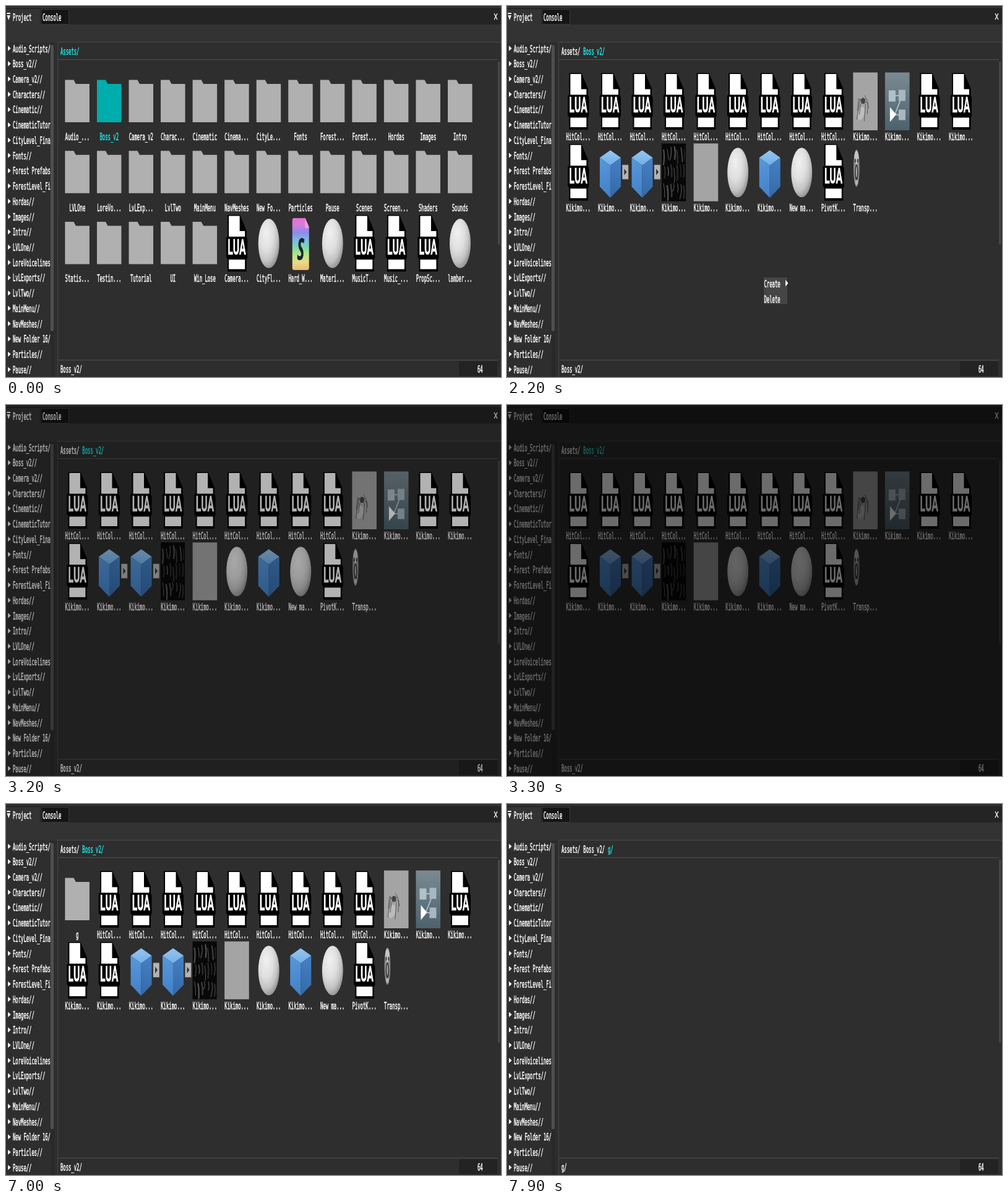
Write an HTML page with a canvas that moves like this. It is 800 by 600 pixels and loops after 8 s.

```html
<!DOCTYPE html>
<html lang="en">
<head>
<meta charset="utf-8">
<title>Asset browser</title>
<style>
html, body { margin: 0; width: 100%; height: 100%; overflow: hidden; background: #2e2e2e; }
canvas { display: block; }
</style>
</head>
<body>
<canvas id="stage" width="800" height="600"></canvas>
<script>
const ctx = document.getElementById('stage').getContext('2d');
const LOOP = 8000;
const SQUEEZE = 0.452;            // the whole interface is narrowed sideways
const UI_FONT = '16px "DejaVu Sans Mono", monospace';
const LOGO_FONT = 'bold 35px Roboto, sans-serif';
const CYAN = '#1fe6e6', WHITE = '#fff';
const COLUMNS = 13, LEFT = 95.4, TOP = 107.5, STEP_X = 51.55, STEP_Y = 114.8;

const tree = ('Audio_Scripts,Boss_v2,Camera_v2,Characters,Cinematic,CinematicTutorial,' +
  'CityLevel_Final,Fonts,Forest Prefabs,ForestLevel_Final,Hordas,Images,Intro,LVLOne,' +
  'LoreVoicelines,LvLExports,LvlTwo,MainMenu,NavMeshes,New Folder 16,Particles,Pause').split(',');

const item = (kind, label) => ({ kind, label });
const folders = ('Audio_...,Boss_v2,Camera_v2,Charac...,Cinematic,Cinema...,CityLe...,Fonts,' +
  'Forest...,Forest...,Hordas,Images,Intro,LVLOne,LoreVo...,LvLExp...,LvlTwo,MainMenu,' +
  'NavMeshes,New Fo...,Particles,Pause,Scenes,Screen...,Shaders,Sounds,Statis...,Testin...,' +
  'Tutorial,UI,Win_Lose').split(',').map(name => item('folder', name));
const parse = list => list.split(',').map(entry => item(...entry.split(':')));

const rootItems = [...folders, ...parse('lua:Camera...,sphere:CityFl...,shader:Hard_W...,' +
  'sphere:Materi...,lua:MusicT...,lua:Music_...,lua:PropSc...,sphere:lamber...')];
const bossItems = [...Array(9).fill(item('lua', 'HitCol...')), ...parse('spider:Kikimo...,' +
  'graph:Kikimo...,lua:Kikimo...,lua:Kikimo...,lua:Kikimo...,model:Kikimo...,model:Kikimo...,' +
  'bones:Kikimo...,plain:Kikimo...,sphere:Kikimo...,cube:Kikimo...,sphere:New ma...,' +
  'lua:PivotK...,mask:Transp...')];
const bossWithFolder = [item('folder', 'g'), ...bossItems];

function rect(x, y, w, h, color) {
  ctx.fillStyle = color;
  ctx.fillRect(x, y, w, h);
}

function poly(color, ...points) {
  ctx.fillStyle = color;
  ctx.beginPath();
  for (let i = 0; i < points.length; i += 2) ctx.lineTo(points[i], points[i + 1]);
  ctx.fill();
}

function line(color, width, ...points) {
  ctx.strokeStyle = color;
  ctx.lineWidth = width;
  ctx.beginPath();
  for (let i = 0; i < points.length; i += 2) ctx.lineTo(points[i], points[i + 1]);
  ctx.stroke();
}

function ellipse(x, y, rx, ry, color, angle = 0) {
  ctx.fillStyle = color;
  ctx.beginPath();
  ctx.ellipse(x, y, rx, ry, angle, 0, Math.PI * 2);
  ctx.fill();
}

function rounded(x, y, w, h, r, color) {
  ctx.fillStyle = color;
  ctx.beginPath();
  ctx.roundRect(x, y, w, h, r);
  ctx.fill();
}

function gradient(x0, y0, x1, y1, ...colors) {
  const g = ctx.createLinearGradient(x0, y0, x1, y1);
  colors.forEach((c, i) => g.addColorStop(i / (colors.length - 1), c));
  return g;
}

// y is the middle of the capitals; the thin stroke gives the font its pixel weight
function text(str, x, y, color = WHITE, align = 'left', font = UI_FONT, drop = 5.5) {
  ctx.save();
  ctx.translate(x, y + drop);
  ctx.scale(SQUEEZE, 1);
  ctx.font = font;
  ctx.textAlign = align;
  ctx.fillStyle = ctx.strokeStyle = color;
  ctx.lineWidth = 0.6;
  ctx.fillText(str, 0, 0);
  ctx.strokeText(str, 0, 0);
  ctx.restore();
}

function seeded(seed) {
  return () => (seed = seed * 16807 % 2147483647) / 2147483647;
}

// Icons are drawn in a cell of 40 by 93
const icons = {
  folder(selected) {
    poly(selected ? '#00adad' : '#b0b0b0', 0, 12, 14, 12, 17.5, 18.5, 39.5, 18.5, 39.5, 80.5, 0, 80.5);
  },
  lua() {
    poly('#000', 5, 1, 25, 1, 35.5, 26, 35.5, 92.5, 5, 92.5);
    poly('#fff', 7, 2.5, 24.5, 2.5, 24.5, 27, 33, 27, 33, 38, 7, 38);
    rect(7, 73, 26, 15.5, '#fff');
    rounded(2.7, 36, 34.3, 36.5, [3, 5], '#000');
    text('LUA', 19.8, 52, '#fff', 'center', LOGO_FONT, 12.4);
  },
  sphere() {
    const g = ctx.createRadialGradient(10, 30, 2, 10, 35, 56);
    g.addColorStop(0, '#efefef');
    g.addColorStop(0.45, '#dfdfdf');
    g.addColorStop(0.75, '#c2c2c2');
    g.addColorStop(1, '#8c8c8c');
    ctx.save();
    ctx.translate(20, 47);
    ctx.scale(0.43, 1);
    ctx.translate(-20, -47);
    ellipse(20, 47, 39.5, 40, g);
    ctx.restore();
  },
  shader() {
    const colors = gradient(0, 6, 4, 90, '#e66fd0', '#d77bdc', '#8b8bea', '#80b6e8', '#7ed9a8',
      '#b7e58a', '#e8dc86', '#eeb878');
    rounded(6.5, 6, 27, 84, 3, colors);
    poly('#2e2e2e', 27, 5, 35, 5, 35, 23);
    poly('#f0a0dc', 27, 6, 33.5, 22, 27, 22);
    text('S', 20, 57, '#17242a', 'center', 'bold italic 48px "Open Sans", sans-serif', 17);
  },
  cube() {
    poly(gradient(0, 11, 0, 36, '#95c5f0', '#72aee8'), 20, 11, 37, 23, 20, 35.5, 3, 23);
    poly(gradient(3, 23, 20, 88, '#5898dc', '#4280c6'), 3, 23, 20, 35.5, 20, 88, 3, 70);
    poly(gradient(37, 23, 20, 88, '#4681c5', '#3568a6'), 37, 23, 20, 35.5, 20, 88, 37, 70);
  },
  model() {
    icons.cube();
    rect(39.3, 34.5, 10, 23.5, '#a4a4a4');
    rect(40, 35.5, 8.6, 21.5, '#b4b4b4');
    poly('#333', 42.5, 41, 46.5, 46.3, 42.5, 51.5);
  },
  plain() {
    rect(0, 0, 39.6, 93.5, '#a4a4a4');
  },
  spider() {
    icons.plain();
    ellipse(13, 66, 5.5, 11, '#bcbcbc', 0.25);
    ellipse(16, 46, 3.5, 5, '#444');
    const legs = [[9, 42, 7, 62], [11, 44, 6, 76], [12, 52, 10, 68], [22, 43, 25, 58],
      [24, 49, 23, 67], [20, 52, 18, 79], [21, 41, 18, 37]];
    for (const leg of legs) line('#444', 0.8, 16, 47, ...leg);
  },
  graph() {
    rect(0, 0, 39.6, 93.5, gradient(0, 0, 0, 93, '#7b8a92', '#637681', '#4d626d'));
    line('#b2c0c8', 1.8, 12, 38, 28, 37, 16, 68, 28, 69);
    rect(6, 29, 11, 18, '#b2c0c8');
    rect(22, 28, 11, 18, '#a8b7c0');
    rect(22, 60, 11, 17, '#a8b7c0');
    poly('#fff', 8, 56, 18, 68, 8, 80);
  },
  bones() {
    rect(0, 0, 39, 93.5, '#080808');
    const random = seeded(91);
    ctx.lineCap = 'round';
    for (let i = 0; i < 21; i++) {
      const x = 3 + i % 7 * 5.3 + random() * 2, y = 5 + Math.floor(i / 7) * 29 + random() * 6;
      const shade = 28 + random() * 60;
      ctx.strokeStyle = `rgb(${shade},${shade},${shade})`;
      ctx.lineWidth = 1 + random() * 1.8;
      ctx.beginPath();
      ctx.moveTo(x, y);
      ctx.quadraticCurveTo(x + 2, y + 10, x + random() * 4 - 2, y + 13 + random() * 11);
      ctx.stroke();
    }
    ctx.lineCap = 'butt';
  },
  mask() {
    ellipse(5.5, 40, 4.8, 30, '#8c8c8c');
    ellipse(5.5, 23, 3.6, 11, '#c4c4c4');
    ellipse(3.5, 28, 1.1, 3.5, '#444');
    ellipse(7.5, 28, 1.1, 3.5, '#444');
    ellipse(5.5, 47, 2.8, 13, '#3a3a3a');
    ellipse(5.5, 46, 1.2, 9, '#a5a5a5');
    ellipse(5.5, 63, 2, 4, '#b5b5b5');
  }
};

function drawChrome() {
  rect(0, 0, 800, 600, '#2e2e2e');
  rect(0, 0, 800, 30, '#242424');
  rect(0, 1.5, 800, 1.5, '#3a3a3a');
  rect(0, 5, 55, 25, '#333');
  rect(56.5, 5, 45.5, 25, '#383838');
  rect(57.5, 6, 43.5, 23, '#151515');
  rect(0, 30, 800, 29, '#333');
  rect(1.5, 11, 5.5, 2, WHITE);
  poly(WHITE, 1.5, 15, 7, 15, 4.2, 23);
  text('Project', 11, 18);
  text('Console', 59, 18);
  line(WHITE, 1.2, 789, 12, 794, 22);
  line(WHITE, 1.2, 794, 12, 789, 22);

  rect(72, 60, 5.5, 540, '#292929');
  rounded(72, 63, 5, 463, 2.5, '#4f4f4f');
  rect(83, 58, 717, 1.2, '#454545');
  rect(83, 58, 1.2, 542, '#434343');
  rect(84, 86, 711, 1.3, '#4a4a4a');
  rect(84, 572, 711, 1.3, '#4a4a4a');
  rounded(795.3, 90, 2.7, 296, 1.3, '#4b4b4b');
  rect(732, 574.5, 62, 24, '#232323');
  text('64', 762, 587);

  ctx.save();
  ctx.beginPath();
  ctx.rect(0, 59, 71.7, 541);
  ctx.clip();
  tree.forEach((name, i) => {
    const y = 69 + i * 24.73;
    poly(WHITE, 3.2, y - 4.7, 7.7, y - 0.5, 3.2, y + 3.7);
    text(name + '//', 11, y);
  });
  ctx.restore();
}

function drawPath(parts, status) {
  let x = 88;
  parts.forEach((part, i) => {
    text(part + '/', x, 73, i === parts.length - 1 ? CYAN : WHITE);
    x += (part.length + 1) * 4.36 + 4.8;
  });
  text(status + '/', 88, 587);
}

function drawItems(items, selected) {
  items.forEach(({ kind, label }, i) => {
    const x = LEFT + i % COLUMNS * STEP_X, y = TOP + Math.floor(i / COLUMNS) * STEP_Y;
    ctx.save();
    ctx.translate(x, y);
    icons[kind](i === selected);
    ctx.restore();
    text(label, x + 19.8, y + 103.8, i === selected ? CYAN : WHITE, 'center');
  });
}

function drawMenu(time) {
  const submenu = time >= 2500, onFolder = time >= 2800;
  rect(415, 439, 38, 43, '#454545');
  if (submenu && !onFolder) rect(415, 440, 38, 20, '#747474');
  text('Create', 415.5, 449);
  text('Delete', 415.5, 474);
  if (submenu) {
    rect(452, 438.5, 49, 117.5, '#4b4b4b');
    if (onFolder) rect(452.5, 440, 48, 20, '#767676');
    ['Folder', 'Material', 'Shader', 'Script', 'Scene'].forEach((name, i) =>
      text(name, 452.5, 449 + i * 24.73));
  }
  poly(WHITE, 450, 443, 454.5, 448.3, 450, 453.5);
}

function draw(time) {
  drawChrome();
  if (time < 1300) {
    drawPath(['Assets'], 'Boss_v2');
    drawItems(rootItems, 1);
  } else if (time < 7000) {
    drawPath(['Assets', 'Boss_v2'], 'Boss_v2');
    drawItems(bossItems);
  } else if (time < 7900) {
    const clicked = time >= 7800;
    drawPath(['Assets', 'Boss_v2'], clicked ? 'g' : 'Boss_v2');
    drawItems(bossWithFolder, clicked ? 0 : -1);
  } else {
    drawPath(['Assets', 'Boss_v2', 'g'], 'g');
  }
  if (time >= 2200 && time < 3200) drawMenu(time);
  if (time >= 3200 && time < 5300) {
    rect(0, 0, 800, 600, `rgba(0,0,0,${time < 3300 ? 0.3 : 0.58})`);
  }
}

function tick() {
  draw(performance.now() % LOOP);
  requestAnimationFrame(tick);
}
tick();
</script>
</body>
</html>
```
